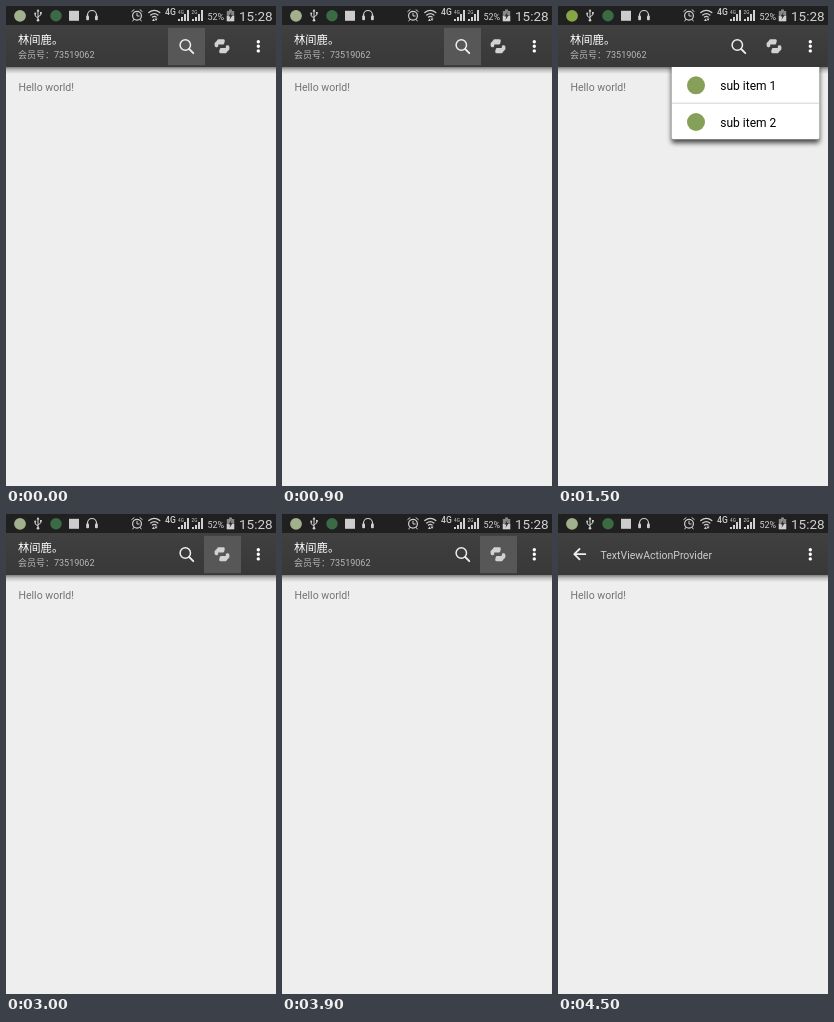
Write an HTML page that moves like this. It is 270x480 px and loops after 6 s.

```html
<!DOCTYPE html>
<html lang="zh">
<head>
<meta charset="utf-8">
<title>Action bar demo</title>
<style>
  html, body { margin: 0; width: 100%; height: 100%; overflow: hidden; background: #eee; }
  svg { display: block; width: 100vw; height: 100vh; }
  text { font-family: Roboto, "Noto Sans CJK SC", "Noto Sans CJK", sans-serif; }
  .account { font-family: Roboto, "Noto Sans CJK JP", "Noto Sans CJK", sans-serif; }
  .line { fill: none; stroke: #eee; stroke-linecap: round; stroke-linejoin: round; }
</style>
</head>
<body>
<svg viewBox="0 0 270 480">
  <defs>
    <linearGradient id="bar" x2="0" y2="1">
      <stop stop-color="#404040"/><stop offset="1" stop-color="#383838"/>
    </linearGradient>
    <linearGradient id="shade" x2="0" y2="1">
      <stop stop-color="#000" stop-opacity=".48"/>
      <stop offset=".4" stop-color="#000" stop-opacity=".2"/>
      <stop offset="1" stop-color="#000" stop-opacity="0"/>
    </linearGradient>
    <filter id="soft" x="-10%" y="-20%" width="120%" height="150%">
      <feGaussianBlur stdDeviation="2.8"/>
    </filter>
    <clipPath id="below"><path d="M0 61H270V480H0z"/></clipPath>
  </defs>

  <path fill="#eee" d="M0 0H270V480H0z"/>
  <path fill="#202020" d="M0 0H270V19H0z"/>
  <path fill="url(#bar)" d="M0 19H270V61H0z"/>
  <path fill="url(#shade)" d="M0 61H270V68H0z"/>
  <text x="12.5" y="84.8" font-size="10.5" fill="#737373">Hello world!</text>

  <!-- status bar -->
  <circle id="badge" cx="14" cy="9.8" r="5.9"/>
  <circle cx="50" cy="9.8" r="5.7" fill="#3b6b45"/>
  <rect x="63" y="4.8" width="10" height="10" fill="#ccc"/>
  <g opacity=".86">
    <g class="line" stroke-width="1">
      <path d="M32 4.5V14M32 12L29.2 10V8M32 10.8L34.8 9V7"/>
      <path d="M81.5 11V9a4.5 4.5 0 0 1 9 0v2" stroke-width="1.2"/>
      <circle cx="131" cy="9.8" r="4.4" stroke-width="1.2"/>
      <path d="M131 7.2V10H133.2M125.8 5.5L128 3.8M134 3.8L136.2 5.5M127.8 13.5L126.8 15M134.2 13.5L135.2 15"/>
      <path d="M142.8 6.6q5.5-4.5 11 0M144.8 9q3.5-2.7 7 0M146.5 11q1.8-1.3 3.6 0" stroke-width="1.3"/>
    </g>
    <g fill="#eee">
      <path d="M32 3L30.5 5.5H33.5z"/><circle cx="32" cy="14.3" r="1.3"/>
      <circle cx="29.2" cy="7.6" r="1"/><path d="M34 6h1.8v1.8H34z"/>
      <rect x="80.2" y="9.5" width="2.8" height="4.8" rx="1"/>
      <rect x="89" y="9.5" width="2.8" height="4.8" rx="1"/>
      <path d="M146 15L147.5 12.5L149 15zM148.5 12.5H151.5L150 15z"/>
      <text x="159" y="9.4" font-size="8.6" font-weight="500">4G</text>
      <text x="172" y="8" font-size="4.7">4G</text>
      <text x="185.5" y="8" font-size="4.7">2G</text>
      <text x="201.5" y="13.6" font-size="9">52%</text>
      <text x="233" y="14.7" font-size="13.5">15:28</text>
      <path d="M172 15v-2h2v2zM175 15v-4h2v4zM178 15V8h2v7zM181 15V4h2v11z"/>
      <path d="M186 15v-2h2v2zM189 15v-4h2v4zM192 15V8h2v7zM195 15V4h2v11z"/>
      <path d="M220.8 5H223V3.6H226V5H228.2V15.2H220.8z" fill="#999"/>
      <path d="M220.8 10H228.2V15.2H220.8z"/>
      <path d="M225.5 6L222.5 10.5H224.3L223.5 14L226.7 9H224.9z" fill="#333"/>
    </g>
  </g>

  <!-- action bar -->
  <rect id="press" y="21.8" width="37" height="37.4" fill="#575757"/>
  <g id="home">
    <text x="12" y="38.4" font-size="11.3" fill="#fff">林间鹿。</text>
    <text class="account" x="12" y="52.2" font-size="9" fill="#b8b8b8">会员号：73519062</text>
    <g class="line" stroke-width="1.5">
      <circle cx="179.3" cy="39" r="5.2"/><path d="M183.2 43L187.3 47.2" stroke-width="1.8"/>
    </g>
    <g fill="#d2d2d2">
      <path id="hand" d="M212 33.3H217.5Q219 33.5 218.8 35L218.2 37.5Q218 38.6 216.8 38.6H212.2V40Q212 41.5 210.3 41.3Q208.6 41 208.6 39.5V37.5Q208.8 36.3 210 35.8z"/>
      <use href="#hand" transform="rotate(180 216 40.3)"/>
    </g>
  </g>
  <g id="search">
    <path class="line" d="M27.3 40.2H16.5M21.5 35L16.3 40.2L21.5 45.4" stroke-width="1.8"/>
    <text x="42.5" y="44.5" font-size="10.5" fill="#ccc">TextViewActionProvider</text>
  </g>
  <path class="line" d="M252.3 35.7h0M252.3 40.3h0M252.3 44.9h0" stroke-width="3.4" style="stroke:#fff"/>

  <!-- drop-down -->
  <g id="menu" clip-path="url(#below)">
    <rect x="113.5" y="60" width="148" height="77" rx="2" opacity=".7" filter="url(#soft)"/>
    <path d="M113.7 61H261.3V131.3a2 2 0 0 1-2 2H115.7a2 2 0 0 1-2-2z" fill="#fff"/>
    <path d="M114 97.2H261" stroke="#c8c8c8" stroke-width=".8"/>
    <g fill="#86a05a"><circle cx="138" cy="79.3" r="9"/><circle cx="138" cy="116" r="9"/></g>
    <g font-size="12"><text x="162.3" y="84">sub item 1</text><text x="162.3" y="120.5">sub item 2</text></g>
  </g>
</svg>
<script>
  const $ = id => document.getElementById(id);
  const show = (id, on) => $(id).style.display = on ? "" : "none";
  const pressX = [162, null, 198, null];

  function draw(now) {
    const step = Math.floor(now % 6000 / 1500);
    show("home", step < 3);
    show("search", step === 3);
    show("menu", step === 1);
    show("press", pressX[step] !== null);
    $("press").setAttribute("x", pressX[step] ?? 0);
    $("badge").setAttribute("fill", step === 1 ? "#86a544" : "#a3b08e");
    requestAnimationFrame(() => draw(performance.now()));
  }
  draw(0);
</script>
</body>
</html>
```
